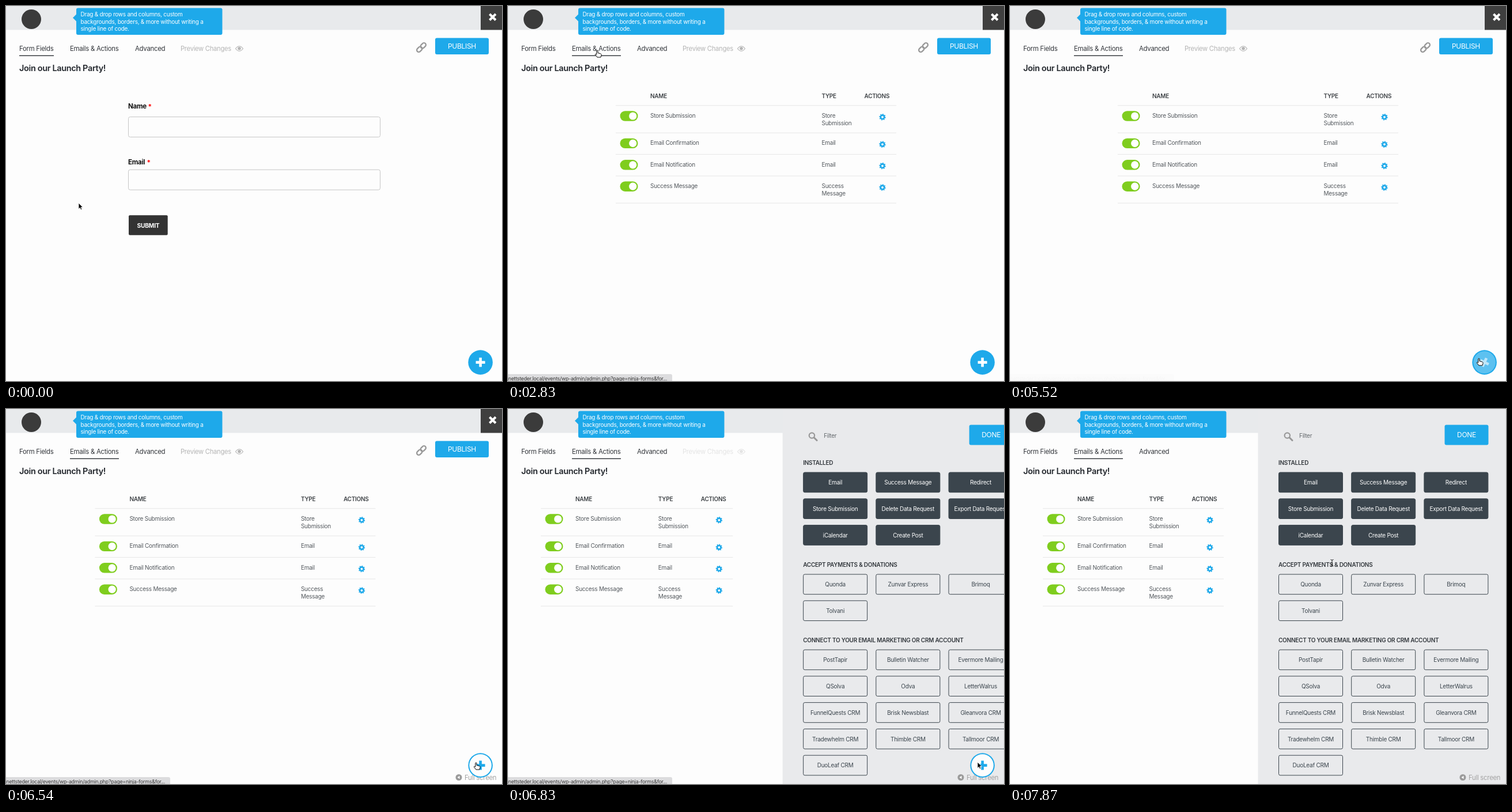
Write an HTML page that moves like this. It is 861 by 651 pixels and loops after 8000 ms.

```html
<!DOCTYPE html>
<html lang="en">
<head>
<meta charset="utf-8">
<title>Form builder</title>
<style>
  html, body { margin: 0; width: 100%; height: 100%; overflow: hidden; background: #fdfdfd; }
  svg { display: block; width: 861px; height: 651px; }
  text { font: 10px Inter, "Liberation Sans", sans-serif; letter-spacing: -.025em; white-space: pre; }
  .nav { font-size: 11.4px; fill: #33363b; }
  .strong { font-weight: 600; }
  .mid { text-anchor: middle; }
</style>
</head>
<body>
<svg id="stage" viewBox="0 0 861 651"></svg>
<script>
const BLUE = '#1ea9ea', SLATE = '#3b454d', PANEL = '#e9eaec', GREY = '#999';
const LOOP = 8000;

// Bursts of screen updates: first time, last time, count.
const bursts = [[450, 900, 4], [1200, 2090, 7], [2390, 2390, 1], [2680, 2830, 2], [3130, 4030, 7],
  [4180, 4780, 5], [5080, 6100, 8], [6390, 7420, 8], [7720, 7870, 2]];
const ticks = [0];
for (const [first, last, count] of bursts)
  for (let i = 0; i < count; i++)
    ticks.push(Math.floor((first + (last - first) * i / Math.max(1, count - 1)) / 10) * 10);

// Pointer path: time, x, y.
const path = [[300, 126, 342], [900, 137, 227], [1050, 137, 227], [2090, 155, 77], [2980, 155, 77],
  [4030, 227, 401], [4780, 716, 516], [4930, 716, 516], [5510, 814, 612], [6100, 816, 614],
  [6530, 816, 614], [6830, 815, 613], [6970, 815, 613], [7420, 769, 380], [7570, 769, 380], [7870, 559, 267]];

const clamp = v => Math.max(0, Math.min(1, v));
const ramp = (t, a, b) => clamp((t - a) / (b - a));
const smooth = p => p * p * (3 - 2 * p);
const mix = (a, b, p) => a + (b - a) * p;

const text = (x, y, s, fill = '#444', attrs = '') =>
  `<text x="${x}" y="${y}" fill="${fill}" ${attrs}>${s.replace(/&/g, '&amp;')}</text>`;
const size = (px, more = '') => `style="font-size:${px}px;${more}"`;
const rect = (x, y, w, h, fill, attrs = '') =>
  `<rect x="${x}" y="${y}" width="${w}" height="${h}" fill="${fill}" ${attrs}/>`;
const circle = (x, y, r, fill, attrs = '') => `<circle cx="${x}" cy="${y}" r="${r}" fill="${fill}" ${attrs}/>`;
const group = (id, body, attrs = '') => `<g id="${id}" ${attrs}>${body}</g>`;

function header() {
  const tip = ['Drag & drop rows and columns, custom', 'backgrounds, borders, & more without writing a',
    'single line of code.'];
  return rect(0, 0, 861, 41.5, '#e8eaec') + circle(44, 23, 17, '#3b3b3b') +
    rect(824, 0, 37, 41.5, '#3f3f3f') +
    `<path d="M839.5 14l10.5 10.5m0-10.5l-10.5 10.5" stroke="#fff" stroke-width="4"/>` +
    rect(122, 3.5, 253.5, 46.5, BLUE, 'rx="3"') + `<path d="M116 20.5l6-6v12z" fill="${BLUE}"/>` +
    tip.map((line, i) => text(129.5, 17.8 + i * 12.7, line, '#fff')).join('');
}

function nav() {
  const eye = `<path d="M398.5 74Q405 65.5 411.5 74Q405 82.5 398.5 74Z" fill="none" stroke="#b5b5b5" stroke-width="1.2"/>` +
    circle(405, 73.7, 2.8, '#b5b5b5');
  const link = [-4.6, 4.6].map(x => rect(x - 5.2, -3.4, 10.4, 6.8, 'none', 'rx="3.4"')).join('');
  return text(23, 77.5, 'Form Fields', '#33363b', 'class="nav"') +
    text(111, 77.5, 'Emails & Actions', '#33363b', 'class="nav"') +
    text(224, 77.5, 'Advanced', '#33363b', 'class="nav"') +
    group('preview', text(303, 77.5, 'Preview Changes', '#b5b5b5', size(11.2)) + eye) +
    `<path id="underline" stroke="#3b3e43" stroke-width="1.6"/>` +
    `<g transform="translate(721 72) rotate(-45)" stroke="${GREY}" stroke-width="2.3">${link}</g>` +
    rect(745, 55.5, 93, 28.5, BLUE, 'rx="3"') +
    text(791.5, 74.3, 'PUBLISH', '#fff', 'class="mid" ' + size(12)) +
    text(23, 113.3, 'Join our Launch Party!', '#23272d', 'class="strong" ' + size(14.5));
}

function form() {
  const field = (label, y, top, starX) =>
    text(212, y, label, '#111', size(11.6, 'font-weight:700')) +
    text(starX, y + 1, '*', '#f00', size(11.6, 'font-weight:700')) +
    rect(212.5, top, 437, 35, '#fdfdfd', 'rx="3" stroke="#c6c6c6"');
  return field('Name', 178.3, 192.5, 246.5) + field('Email', 274.8, 284.2, 244.5) +
    rect(213, 363.3, 67.7, 34.5, '#333', 'rx="2"') +
    text(247, 384.7, 'SUBMIT', '#fff', 'class="mid" ' + size(10.3, 'font-weight:700'));
}

const rules = [172.8, 220.2, 257.6, 295, 342.2];

function table() {
  const rows = [['Store Submission', 'Store|Submission'], ['Email Confirmation', 'Email'],
    ['Email Notification', 'Email'], ['Success Message', 'Success|Message']];
  const head = (x, s) => text(x, 159.5, s, '#3f4347', 'class="strong"');
  const gear = y => `<g transform="translate(-24 ${y})" fill="none" stroke="${BLUE}">` +
    `<circle r="3.2" stroke-width="2.6"/><circle r="4.8" stroke-width="1.9" pathLength="16" stroke-dasharray="1"/></g>`;
  let left = head(60, 'NAME'), right = head(-129.5, 'TYPE') + head(-55.5, 'ACTIONS');
  rows.forEach(([name, type], i) => {
    const y = rules[i] + 18.2;
    left += rect(7.5, y - 8.7, 31, 17.4, '#7fcd1e', 'rx="8.7"') + circle(29.7, y, 6.6, '#fff') +
      text(60, y + 3, name, '#53585d');
    type.split('|').forEach((line, j) => right += text(-129.5, y + 3 + j * 12.6, line, '#53585d'));
    right += gear(y + 1.8);
  });
  return `<path id="rules" stroke="#e6e6e6"/>` + group('tableLeft', left) + group('tableRight', right);
}

function drawer() {
  const sections = [
    ['INSTALLED', 97.4, 110, ['Email', 'Success Message', 'Redirect', 'Store Submission',
      'Delete Data Request', 'Export Data Request', 'iCalendar', 'Create Post']],
    ['ACCEPT PAYMENTS & DONATIONS', 274.3, 287, ['Quonda', 'Zunvar Express', 'Brimoq', 'Tolvani']],
    ['CONNECT TO YOUR EMAIL MARKETING OR CRM ACCOUNT', 405.3, 418, ['PostTapir', 'Bulletin Watcher',
      'Evermore Mailing', 'QSolva', 'Odva', 'LetterWalrus', 'FunnelQuests CRM', 'Brisk Newsblast',
      'Gleanvora CRM', 'Tradewhelm CRM', 'Thimble CRM', 'Tallmoor CRM', 'DuoLeaf CRM']]];
  const button = (label, i, top, dark) => {
    const x = 36 + i % 3 * 126.2, y = top + Math.floor(i / 3) * 45.8;
    return rect(x, y, 111, 34.7, dark ? SLATE : 'none', `rx="2.5" stroke="${SLATE}"`) +
      text(x + 55.5, y + 21.2, label, dark ? '#fff' : SLATE, 'class="mid"');
  };
  return rect(0, 0, 861, 651, PANEL) +
    `<path d="M54.5 49.5l5 5" stroke="${GREY}" stroke-width="3" stroke-linecap="round"/>` +
    circle(50.8, 46, 4.7, 'none', `stroke="${GREY}" stroke-width="2.2"`) +
    text(71.5, 49.6, 'Filter', '#62676b') +
    rect(324, 27.5, 76, 35, BLUE, 'rx="3"') + text(362, 49.3, 'DONE', '#fff', 'class="mid" ' + size(12)) +
    sections.map(([title, y, top, labels], s) => text(35.5, y, title, '#33383d', 'class="strong"') +
      labels.map((label, i) => button(label, i, top, s === 0)).join('')).join('');
}

function overlays() {
  const plus = (id, color) => `<path id="${id}" d="M-8 0H8M0-8V8" stroke="${color}" stroke-width="4.6"/>`;
  return group('fullScreen', circle(786, 639.5, 5.5, '#9b9b9b') +
      `<path d="M783.5 639.5l4-2.8v5.6z" fill="#fff"/>` + text(796, 643.5, 'Full screen', '#a3a3a3', size(11.4))) +
    group('fab', circle(0, 0, 21.3, BLUE) + circle(0, 0, 19.3, '#fdfdfd', 'id="fabInner"') +
      group('plus', plus('plusWhite', '#fff') + plus('plusBlue', BLUE)), 'transform="translate(823.6 618.6)"') +
    group('status', `<path d="M0 639H282q3 0 3 3V651H0Z" fill="#dcdcde"/>` +
      text(276, 649.5, 'nettsteder.local/events/wp-admin/admin.php?page=ninja-forms&for...', '#333',
        'text-anchor="end" ' + size(8.8))) +
    group('pointer',
      `<path id="arrow" d="M0 0V10.5L2.4 8.3L4 11.8L5.8 11L4.3 7.5H7.4Z" fill="#000" stroke="#fff" stroke-width=".8"/>` +
      `<path id="hand" d="M-1.2 1C-1.2-.4 1-.4 1 1V4.5L5.5 5.7C7 6.2 7.2 7 7 8.5L6 12H0L-3.6 7.6C-4 6.2-2.6 6-1.2 7.3Z" fill="#fff" stroke="#000"/>` +
      `<path id="beam" d="M-2.5-5.5Q0-5.5 0-4V4Q0 5.5-2.5 5.5M2.5-5.5Q0-5.5 0-4M0 4Q0 5.5 2.5 5.5M-1.5 2.5H1.5" fill="none" stroke="#222"/>`);
}

const stage = document.getElementById('stage');
stage.innerHTML = rect(0, 0, 861, 651, '#fdfdfd') + header() + nav() + group('form', form()) +
  group('table', table()) + group('drawer', drawer()) + overlays();

const set = (id, attr, value) => document.getElementById(id).setAttribute(attr, value);
const alpha = (id, value) => set(id, 'opacity', +value);

function pointerAt(t) {
  const next = path.findIndex(key => key[0] > t);
  if (next === 0) return path[0].slice(1);
  if (next < 0) return path.at(-1).slice(1);
  const [t0, x0, y0] = path[next - 1], [t1, x1, y1] = path[next];
  const p = smooth(ramp(t, t0, t1));
  return [mix(x0, x1, p), mix(y0, y1, p)];
}

function render(time) {
  const t = ticks.findLast(tick => tick <= time);

  const actionsTab = t >= 2680;
  set('underline', 'd', actionsTab ? 'M111 86.2H196' : 'M23 86.2H83');
  alpha('form', !actionsTab);
  alpha('table', ramp(t, 2530, 2830));

  // The table stays centred in the free space and shrinks once that runs out.
  const space = mix(861, 428, smooth(ramp(t, 6413, 6891)));
  const width = Math.min(487, space - 114), left = (space - width) / 2;
  set('tableLeft', 'transform', `translate(${left})`);
  set('tableRight', 'transform', `translate(${left + width})`);
  set('rules', 'd', rules.map(y => `M${left} ${y}h${width}`).join(''));

  set('drawer', 'transform', `translate(${mix(861, 430.5, smooth(ramp(t, 6540, 6904)))})`);
  alpha('preview', 1 - ramp(t, 6540, 6980));
  alpha('fullScreen', t >= 6390);

  const hover = ramp(t, 5370, 5870);
  alpha('fabInner', hover);
  alpha('plusBlue', hover);
  set('plus', 'transform', `rotate(${hover * 90})`);
  alpha('fab', t < 6970);

  const linkHover = t >= 2390 && t < 5810 ? 1 - .97 * ramp(t, 3280, 3730) : t >= 5810 && t < 6970;
  alpha('status', linkHover);

  set('pointer', 'transform', `translate(${pointerAt(t)})`);
  const hand = t >= 2090 && t < 3130 || t >= 5370 && t < 6830;
  const beam = t >= 7870;
  alpha('hand', hand);
  alpha('beam', beam);
  alpha('arrow', !hand && !beam);
}

const start = performance.now();
function loop() {
  render((performance.now() - start) % LOOP);
  requestAnimationFrame(loop);
}
loop();
</script>
</body>
</html>
```
